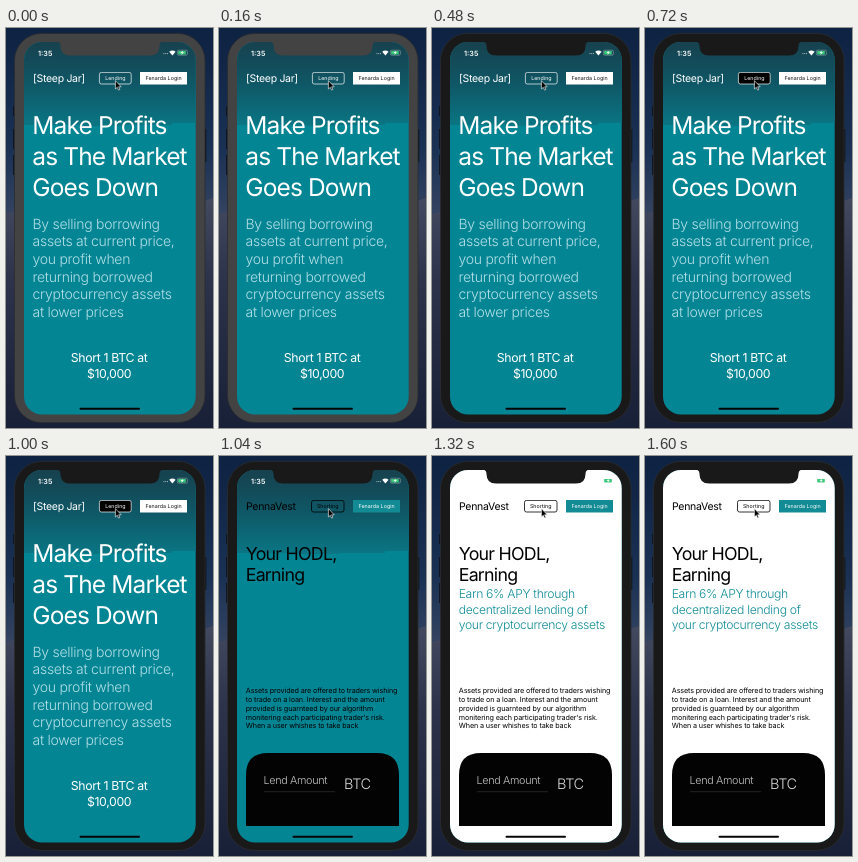
Recreate the animation shown at these times as an HTML page. Size 207x400 px, loop 2.04 s.

```html
<!DOCTYPE html>
<html lang="en">
<head>
<meta charset="utf-8">
<title>Phone landing pages</title>
<style>
  html, body { margin: 0; width: 100%; height: 100%; overflow: hidden; background: #0e2242; }
  svg { display: block; width: 207px; height: 400px; }
  text { font-family: Inter, Roboto, "Open Sans", sans-serif; white-space: pre; text-rendering: geometricPrecision; }
  .brand { font-size: 10.5px; letter-spacing: -.3px; }
  .label { font-size: 5.3px; letter-spacing: .05px; text-anchor: middle; }
  .hero { font-size: 24.5px; letter-spacing: -.87px; }
  .lead { font-size: 14px; font-weight: 300; letter-spacing: -.27px; }
  .offer { font-size: 12.3px; letter-spacing: -.35px; text-anchor: middle; }
  .title { font-size: 17.8px; letter-spacing: -.75px; }
  .rate { font-size: 12.2px; font-weight: 300; letter-spacing: -.33px; }
  .note { font-size: 7.2px; letter-spacing: -.12px; }
  .field { font-size: 10.8px; font-weight: 300; letter-spacing: -.33px; }
  .coin { font-size: 14.5px; font-weight: 300; letter-spacing: -.4px; }
  .clock { font-size: 7.2px; font-weight: 600; }
</style>
</head>
<body>
<svg viewBox="0 0 207 400">
  <defs>
    <linearGradient id="dusk" x2="0" y2="1">
      <stop offset="0" stop-color="#0e2242"/>
      <stop offset=".3" stop-color="#1a3154"/>
      <stop offset=".5" stop-color="#394763"/>
    </linearGradient>
    <linearGradient id="dune" x2="0" y2="1">
      <stop offset="0" stop-color="#434a60"/>
      <stop offset=".35" stop-color="#2c334a"/>
      <stop offset="1" stop-color="#182038"/>
    </linearGradient>
    <linearGradient id="sky" gradientUnits="userSpaceOnUse" x1="0" y1="14" x2="0" y2="98">
      <stop offset="0" stop-color="#17414e"/>
      <stop offset=".5" stop-color="#0f5766"/>
      <stop offset="1" stop-color="#0a7684"/>
    </linearGradient>
    <clipPath id="screen"><rect x="18" y="14" width="171.7" height="372.5" rx="18"/></clipPath>
  </defs>

  <rect width="207" height="400" fill="url(#dusk)"/>
  <path d="M0 186L30 178L120 200L207 170V400H0Z" fill="url(#dune)"/>
  <path d="M7.8 78V88M7.8 101V121M7.8 127V147M199.6 101V134" stroke="#10141c" stroke-width="1.4"/>
  <rect id="bezel" x="8.5" y="5.5" width="190.5" height="389" rx="27" stroke="#2a2c2f" stroke-width=".8"/>

  <g clip-path="url(#screen)">
    <rect x="18" y="14" width="172" height="373" fill="#048594"/>
    <path d="M18 14H190V95H166V97H120V98H78V97H18Z" fill="url(#sky)"/>
    <rect id="white" x="18" y="14" width="172" height="373" fill="#fff"/>

    <g id="short" fill="#fff">
      <text class="brand" x="27" y="54">[Steep Jar]</text>
      <rect id="press" x="93.4" y="44.4" width="31.8" height="11.6" rx="2" fill="#000" fill-opacity="0" stroke="#fff" stroke-opacity=".85" stroke-width=".8"/>
      <text class="label" x="109.4" y="52.2">Lending</text>
      <rect x="134" y="44" width="47" height="12.5"/>
      <text class="label" x="157.6" y="52.2" fill="#111">Fenarda Login</text>
      <g id="shortCopy"></g>
    </g>

    <g id="lend">
      <text class="brand" x="27" y="54">PennaVest</text>
      <rect x="92.5" y="44.4" width="32.5" height="11.6" rx="2" fill="none" stroke="#000" stroke-width=".8"/>
      <text class="label" x="108.7" y="52.2">Shorting</text>
      <rect x="134" y="44" width="47" height="12.5" fill="#128b94"/>
      <text class="label" x="157.6" y="52.2" fill="#fff">Fenarda Login</text>
      <path d="M27 370V319Q27 297 49 297H158Q180 297 180 319V370Z" fill="#030303"/>
      <path d="M45 335.7H116" stroke="#2b2b2b" stroke-width=".8"/>
      <g id="lendCopy"></g>
    </g>

    <g fill="#fff">
      <text class="clock" x="32" y="27.6">1:35</text>
      <path d="M157.5 25.6h.9M159.3 25.6h.9M161.1 25.6h.9" stroke="#fff" stroke-opacity=".7"/>
      <path d="M163.2 23.7Q166.4 21.1 169.6 23.7L166.4 27.4Z"/>
      <rect x="171.4" y="22.2" width="10" height="5" rx="1.3" fill="none" stroke="#fff" stroke-opacity=".6" stroke-width=".5"/>
      <rect x="172.2" y="22.9" width="7.6" height="3.6" rx=".7" fill="#3cc97c"/>
      <path d="M176.8 22.6L174.6 25H176L175.4 26.9L177.8 24.3H176.3Z"/>
    </g>
    <rect x="73.5" y="379.8" width="60.5" height="1.9" rx=".95" fill="#050505"/>
  </g>

  <path id="notch" d="M50 13.5Q54.5 13.5 54.5 18Q54.5 27.5 64 27.5H144Q153.5 27.5 153.5 18Q153.5 13.5 158 13.5Z"/>
  <path d="M109.4 52.6V61L111.3 59.3L112.6 62.1L113.9 61.5L112.6 58.8H115.2Z" fill="#000" stroke="#fff" stroke-width=".6"/>
</svg>
<script>
const LOOP = 2040, SWITCH = 1040, BRIGHT = 1080;
const byId = id => document.getElementById(id);

function addText(parent, cls, x, y, leading, lines, fill) {
  lines.forEach((line, i) => {
    const el = document.createElementNS("http://www.w3.org/2000/svg", "text");
    el.setAttribute("class", cls);
    el.setAttribute("x", x);
    el.setAttribute("y", y + i * leading);
    if (fill) el.setAttribute("fill", fill);
    el.textContent = line;
    parent.append(el);
  });
}

const short = byId("shortCopy"), lend = byId("lendCopy");
addText(short, "hero", 26.3, 106, 30.8, ["Make Profits", "as The Market", "Goes Down"]);
addText(short, "lead", 26.5, 200.8, 17.6, [
  "By selling borrowing", "assets at current price,", "you profit when",
  "returning borrowed", "cryptocurrency assets", "at lower prices"
], "#b2e0e6");
addText(short, "offer", 103.1, 334, 15.8, ["Short 1 BTC at", "$10,000"]);

addText(lend, "title", 26.7, 103.7, 21.6, ["Your HODL,", "Earning"]);
addText(lend, "note", 26.8, 237.4, 8.75, [
  "Assets provided are offered to traders wishing",
  "to trade on a loan. Interest and the amount",
  "provided is guarnteed by our algorithm",
  "monitering each participating trader's risk.",
  "When a user whishes to take back"
]);
addText(lend, "field", 44.5, 328, 0, ["Lend Amount"], "#c4c4c4");
addText(lend, "coin", 125, 333, 0, ["BTC"], "#d8d8d8");

const rate = document.createElementNS("http://www.w3.org/2000/svg", "g");
lend.append(rate);
addText(rate, "rate", 26.7, 142, 15.6, [
  "Earn 6% APY through", "decentralized lending of", "your cryptocurrency assets"
], "#0f8c95");

// Each track lists [ms, value]; hard tracks hold a value until the next entry.
function track(el, prop, points, hard) {
  const frames = points.map(([ms, value]) => ({
    offset: ms / LOOP, [prop]: value, easing: hard ? "step-end" : "linear"
  }));
  frames.push({ offset: 1, [prop]: points.at(-1)[1] });
  el.animate(frames, { duration: LOOP, iterations: Infinity }).startTime = document.timeline.currentTime;
}

track(byId("short"), "opacity", [[0, 1], [SWITCH, 0]], true);
track(byId("lend"), "opacity", [[0, 0], [SWITCH, 1]], true);
track(byId("white"), "opacity", [[0, 0], [BRIGHT, 1]], true);
track(rate, "opacity", [[0, 0], [BRIGHT, 1]], true);
track(byId("press"), "fillOpacity", [[0, 0], [480, 0], [680, 1]]);
for (const id of ["bezel", "notch"])
  track(byId(id), "fill", [[0, "#434343"], [360, "#191919"]], true);
</script>
</body>
</html>
```
